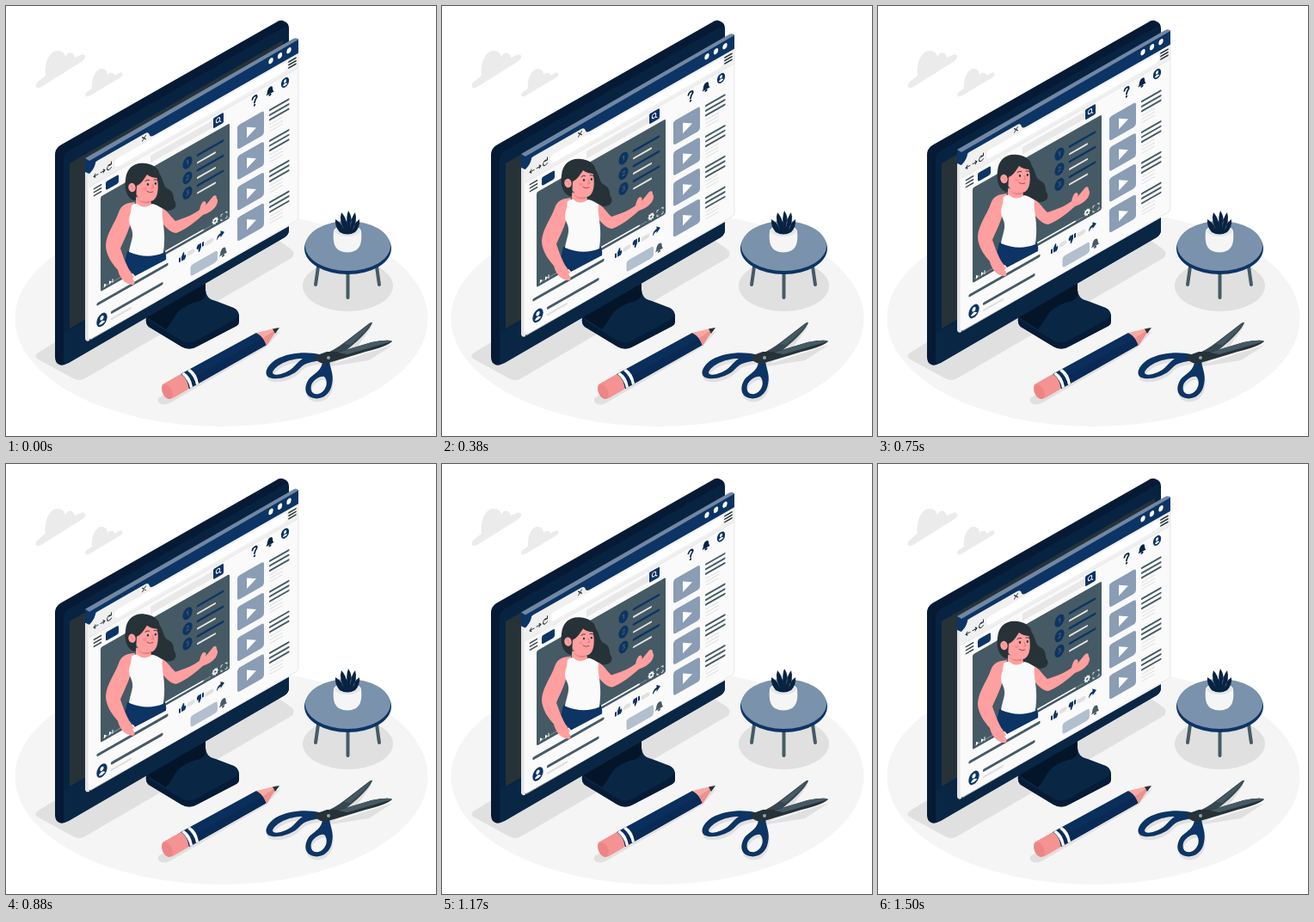
Write an HTML page with a canvas that moves like this. It is 500 by 500 pixels and loops after 1.54 s.

```html
<!DOCTYPE html>
<html lang="en">
<head>
<meta charset="utf-8">
<title>Floating video page</title>
<style>
html, body { margin: 0; width: 100%; height: 100%; overflow: hidden; background: #fff; }
canvas { display: block; width: 500px; height: 500px; }
</style>
</head>
<body>
<canvas id="stage"></canvas>
<script>
const LOOP = 1540, FRAMES = 37, RISE = 10;
const NAVY = '#0c3464', DEEP = '#082342', EDGE = '#092645', SLATE = '#455a64', COAL = '#263238';
const SKIN = '#ff9f9f', BLUE = '#8a9db5', FLOOR = '#f5f5f5', SHADE = '#e0e0e0', PALE = '#ebebeb';

const LEFT_HANDLE = 'M364 405C352 402 330 402 314 411C303 418 299 428 306 432C316 436 334 430 341 422C347 415 354 414 366 412ZM310 426C313 418 328 410 345 410C338 414 335 422 325 426C318 429 310 430 310 426Z';
const RIGHT_HANDLE = 'M368 410L376 411C376 420 382 428 379 440C377 452 367 458 358 456C347 454 346 443 352 434C358 427 369 424 368 410ZM370 431C375 436 373 446 366 450C358 454 353 448 355 441C357 435 365 430 370 431Z';

const canvas = document.getElementById('stage');
const ctx = canvas.getContext('2d');
const dpr = window.devicePixelRatio || 1;
canvas.width = canvas.height = 500 * dpr;

function fill(color, d) {
  ctx.fillStyle = color;
  ctx.fill(new Path2D(d), 'evenodd');
}

function stroke(color, width, d) {
  ctx.strokeStyle = color;
  ctx.lineWidth = width;
  ctx.stroke(new Path2D(d));
}

function oval(color, x, y, rx, ry = rx, turn = 0) {
  ctx.fillStyle = color;
  ctx.beginPath();
  ctx.ellipse(x, y, rx, ry, turn, 0, Math.PI * 2);
  ctx.fill();
}

function box(color, x, y, w, h, r = 0) {
  ctx.fillStyle = color;
  ctx.beginPath();
  ctx.roundRect(x, y, w, h, r);
  ctx.fill();
}

function bar(color, width, x1, x2, y) {
  stroke(color, width, `M${x1} ${y}H${x2}`);
}

function placed(x, y, draw) {
  ctx.save();
  ctx.translate(x, y);
  draw();
  ctx.restore();
}

function drawClouds() {
  fill(PALE, 'M36 89L46 81C44 65 51 52 60 52C66 52 68 55 69 59C72 52 79 54 80 60L87 57C93 55 94 60 89 64L41 94C35 97 33 93 36 89Z');
  fill(PALE, 'M94 100L100 96C99 83 105 73 111 73C116 73 118 76 118 80C121 76 126 77 126 81L131 78C136 76 137 80 133 83L98 104C93 107 90 104 94 100Z');
}

function drawMonitor() {
  fill(SHADE, 'M36 404L62 388L316 272L332 283Q337 288 332 293L92 433Q85 437 78 433L36 410Q33 407 36 404Z');
  fill(EDGE, 'M163 362L232 321V330C233 339 237 341 244 343L265 351Q271 354 271 361V367Q271 370 268 372L222 396Q213 401 204 396L166 373Q162 370 163 362Z');
  fill('#04152a', 'M163 361L190 344L232 320V331C233 338 230 342 222 344C207 348 200 354 195 363Q191 370 186 376L167 364Z');
  fill('#061b35', 'M163 362Q166 366 171 369L204 389Q213 394 222 389L265 365Q270 362 271 358V367Q271 370 268 372L222 396Q213 401 204 396L166 373Q162 370 163 362Z');
  fill('#061a35', 'M57 173Q57 166 63 162L314 19Q319 15 324 18Q329 20 329 26V260Q329 266 324 269L72 415Q66 419 62 417Q57 415 57 408Z');
  fill(DEEP, 'M67 179Q67 173 72 169L321 26Q329 21 329 29V254Q329 260 324 263L73 409Q67 412 67 407Z');
  fill(EDGE, 'M67 381L329 230V260Q329 266 324 269L73 415Q67 418 67 413Z');
  fill(COAL, 'M74 183L322 40V232L74 375Z');
}

function drawTable() {
  oval(SHADE, 397.5, 325.5, 52.5, 29.5);
  ctx.lineCap = 'round';
  stroke(SLATE, 4, 'M363 303L360 324M397.5 308V339M431 303L434 324');
  oval(NAVY, 397.5, 282, 50.5, 30);
  oval('#7a92ac', 397.5, 279, 49.5, 29);
  fill('#f5f5f5', 'M381 262C381 253 413 253 413 262C414 272 413 280 407 284Q397 289 387 284C381 280 380 272 381 262Z');
  fill('#e3e6e9', 'M382 262C383 255 411 255 412 262C408 270 386 270 382 262Z');
  fill(DEEP, 'M388 263Q382 256 383 248Q389 251 393 260Q387 249 390 240Q396 246 397 257Q395 246 398 238Q404 246 400 257Q401 246 406 240Q409 250 403 260Q406 251 411 248Q412 257 406 263Q397 268 388 263Z');
}

function drawPencil() {
  fill(SHADE, 'M177 456L298 387L319 378L302 397L190 462Q181 466 177 460Z');
  fill('#f49391', 'M182 440L203 428Q211 433 213 445L194 456Q186 459 182 449Q180 443 182 440Z');
  oval('#ec8585', 187.5, 448.5, 5.5, 9, -.45);
  fill('#0a2f5c', 'M203 428L291 380Q298 380 303 394L213 445Q211 433 203 428Z');
  fill('#092a54', 'M211 436L299 386L303 394L213 445Z');
  for (const shift of [0, 7]) {
    placed(shift, -shift * .57, () => fill('#fff', 'M204 428L207 426Q215 431 217 443L214 444.5Q212 434 204 428Z'));
  }
  fill('#f7aaa3', 'M291 380L316 374L303 395Q300 385 291 380Z');
  fill('#ec918d', 'M299 386L316 375L303 395Z');
  fill(COAL, 'M310 375.5L318 374L313 381Z');
}

function drawScissors() {
  placed(1, 4, () => {
    fill(SHADE, LEFT_HANDLE);
    fill(SHADE, RIGHT_HANDLE);
    fill(SHADE, 'M367 407L397 386L425 368L407 393L380 412L449 390L421 408L377 415Z');
  });
  fill(NAVY, LEFT_HANDLE);
  fill(NAVY, RIGHT_HANDLE);
  fill('#37474f', 'M369 405Q381 401 395 390L421 370Q425 367 426 368Q424 375 408 390Q390 406 372 415Z');
  fill(SLATE, 'M393 393L425 368Q421 376 400 394Z');
  fill(COAL, 'M359 407L373 402L388 402L425 391Q446 387 449 390Q443 396 418 402Q389 411 371 416Q360 415 359 407Z');
  fill(SLATE, 'M386 403L425 391Q446 387 449 390L397 405Z');
  oval('#90a4ae', 375, 409, 2);
}

function drawPerson(color, r) {
  oval(color, 0, 0, r, r * 1.2);
  oval('#fff', 0, -r * .35, r * .34, r * .4);
  fill('#fff', `M${-r * .6} ${r * .6}Q0 ${-r * .2} ${r * .6} ${r * .6}Q0 ${r} ${-r * .6} ${r * .6}Z`);
}

function drawBell(color) {
  fill(color, 'M-4.5 3Q-3 1 -3 -2Q-2 -5 0 -5Q3 -5 3 -2Q3 1 4.5 3Z');
  oval(color, 0, 4.3, 1.6, 1.2);
}

function drawThumb() {
  fill(NAVY, 'M-4 -1H-2V4H-4ZM-1 -1L1 -5Q3 -5 2 -1H4Q5 2 3 4H-1Z');
}

function drawBrowserBar() {
  box(NAVY, 0, 0, 248, 19);
  fill('#f0f0f0', 'M0 35V19Q11 18 11 13Q11 10 14 10H70Q74 10 75 15Q76 18 80 18H248V35Z');
  box('#fff', 34, 20.5, 201, 10, 5);
  bar('#e6e6e6', 1, 5, 248, 35);
  for (const x of [216, 226.5, 237]) oval('#fff', x, 8.8, 2.7, 3.3);
  stroke(COAL, 1, 'M66.5 12.5L70.5 17M70.5 12.5L66.5 17');
  stroke(COAL, 1, 'M15 26H10M12 24L10 26L12 28M18 26H23M21 24L23 26L21 28M30 23Q26 21 25.5 26Q27 30 30.5 27M30.5 20.5V23.5H28');
  for (const y of [22, 25.5, 29]) bar(COAL, 1.6, 237, 245, y);
}

function drawHeader() {
  for (const y of [40.5, 44.5, 48.5]) bar('#37474f', 1.7, 10.5, 18.5, y);
  box(NAVY, 24, 40, 15, 10, 2);
  box('#e8e8e8', 76, 39.5, 72, 8.5, 1);
  box(NAVY, 149, 37.5, 12, 12, 1.5);
  stroke('#fff', 1, 'M158 46.5L156 44.7M156.7 42.7A2.2 2.5 0 1 1 152.3 42.7A2.2 2.5 0 1 1 156.7 42.7');
  stroke(DEEP, 2, 'M194.5 41.5Q195 39 197 39Q200 39 199.5 42Q197 44 197 46.5');
  oval(DEEP, 197, 49.5, 1.2);
  placed(215, 43.5, () => drawBell(DEEP));
  placed(232.5, 43.5, () => drawPerson(NAVY, 4.6));
}

function drawVideo() {
  box(SLATE, 18, 54, 150, 110.5, 2);
  ctx.textAlign = 'center';
  ctx.textBaseline = 'middle';
  ctx.font = '700 8px "Open Sans", sans-serif';
  for (let i = 0; i < 3; i++) {
    const y = 72 + i * 17.6;
    oval(NAVY, 119, y, 5.6, 6.8);
    ctx.fillStyle = SLATE;
    ctx.fillText(i + 1, 119, y + .5);
    bar(NAVY, 2.7, 131, 160, y - 2);
    bar('#e6e6e6', 2.1, 131, 151, y + 6.7);
  }
  bar('#788990', 1.3, 21, 146, 160.8);
  bar('#fff', 1.8, 94, 137, 160.8);
  fill('#fff', 'M22 157.5V162L25 160ZM28 157.5V162L31 160ZM31.5 157.5H32.5V162H31.5Z');
  stroke('#fff', 1.4, 'M153.5 158A2.3 2.6 0 1 1 148.9 158A2.3 2.6 0 1 1 153.5 158');
  stroke('#fff', .8, 'M151.2 154.2V162M147.6 158H154.8M148.7 155L153.7 161M153.7 155L148.7 161');
  oval(SLATE, 151.2, 158, 1.1);
  stroke('#fff', .8, 'M158 157V155H160M163 155H165V157M165 160V162H163M160 162H158V160');
}

function drawDetails() {
  bar(SLATE, 3.3, 15, 95, 177);
  bar(SLATE, 3.3, 31.5, 89, 195.8);
  bar(SHADE, 2.5, 31, 53, 203.5);
  placed(19.5, 198, () => drawPerson(NAVY, 6.2));
  placed(113, 178.5, drawThumb);
  placed(134, 178.5, () => { ctx.rotate(Math.PI); drawThumb(); });
  bar(SHADE, 5, 121, 125, 178.5);
  bar(SHADE, 5, 142, 147, 178.5);
  fill(NAVY, 'M153 182Q153 176 157.5 176V173L162 177L157.5 181V178.5Q155 178.5 153 182Z');
  box('#b2bfce', 122.5, 193.5, 31.5, 13, 3);
  placed(160.5, 199.5, () => drawBell(SLATE));
}

function drawList() {
  for (let i = 0; i < 4; i++) {
    const y = i * 35.7;
    box(BLUE, 177, y + 62, 31, 28, 3);
    fill('#fff', `M188 ${y + 70}L199 ${y + 77}L188 ${y + 82.5}Z`);
    for (let k = 0; k < 3; k++) {
      bar(SLATE, 2.2, 215, 236.5, y + 65.5 + k * 5.6);
      bar('#dedede', 1, 215, 229.5, y + 82 + k * 4);
    }
  }
}

function drawWoman() {
  fill(COAL, 'M170 190C184 194 181 207 187 212C198 217 193 224 197 228C200 238 188 240 180 236L158 230Z');
  fill(NAVY, 'M141 285L184 284Q187 290 186 295L150 314Q144 306 137 303Z');
  fill(SKIN, 'M150 228C140 229 134 231 131 240C127 252 117 264 116 278C116 290 124 300 130 307C132 316 138 323 146 324C151 325 150 320 147 317L149 315C144 309 139 300 133 282C136 274 143 262 146 248Z');
  fill(SKIN, 'M177 234C186 234 190 244 197 250C209 246 219 242 225 237C226 232 228 227 231 227C233 228 233 230 232 232L241 221C244 219 245 221 245 224C247 226 246 229 244 233C240 238 235 241 229 243C221 250 209 260 198 264Q190 264 179 249Z');
  fill(SKIN, 'M151 222L168 224L169 231L181 235L179 246L142 243L141 231Q144 230 151 230Z');
  fill('#fafafa', 'M146 232Q150 229 153 230Q160 237 170 230Q176 231 182 236C180 249 187 259 183 287Q164 295 143 286C145 273 150 267 145 257Q141 250 145 240Z');
  fill('#e78280', 'M153 224Q160 230 168 226L167 229Q158 231 153 224Z');
  fill(SKIN, 'M149 205C149 191 174 190 176 202C178 214 176 227 167 227C158 227 151 222 149 213Z');
  fill(COAL, 'M148 226C141 223 137 213 139 202C140 187 151 181 162 183C173 184 182 192 177 200Q169 200 164 196C160 202 157 207 152 209L151 226Z');
  oval(SKIN, 146.5, 211, 4.2, 5.2, -.2);
  stroke('#e78280', .9, 'M144.5 209Q147 208 147.5 213');
  oval(COAL, 165, 207.5, 1.1, 1.4);
  oval(COAL, 173.8, 206.5, 1.1, 1.4);
  stroke(COAL, .9, 'M162 203.5Q164 201.5 166.5 202.5M172 202Q174 201 176 202.5');
  stroke('#e06b70', .9, 'M170 207L171.8 211.5L169.5 212');
  stroke('#9d3d48', .9, 'M164 215.5Q167 218 171 216');
  oval('#f98c90', 161.5, 212.5, 2.4, 1.8);
}

function drawPage() {
  fill('#e3e3e3', 'M92 179L97 181V389Q93 391 92 387Z');
  ctx.save();
  ctx.transform(1, -.57, 0, 1, 92, 178);
  ctx.beginPath();
  ctx.roundRect(3.5, 1, 244.5, 212, [2, 2, 4, 4]);
  ctx.clip();
  box('#fafafa', 0, 0, 248, 214);
  drawBrowserBar();
  drawHeader();
  drawVideo();
  drawDetails();
  drawList();
  ctx.restore();
  stroke('#dedede', .7, 'M340 55V245Q340 248 337 250L98 388');
  fill(NAVY, 'M92 178L104 174V183Q102 190 97 195L92 193Z');
  fill('#7187a3', 'M92 177L334 38Q338 36 340 39L97 180Z');
  drawWoman();
}

function draw(now) {
  const t = (now - start) % LOOP;
  const step = Math.min(FRAMES - 1, Math.floor((t + 3) * FRAMES / LOOP));
  const half = (FRAMES - 1) / 2;
  const lift = RISE * (1 - Math.abs(step - half) / half);

  ctx.setTransform(dpr, 0, 0, dpr, 0, 0);
  ctx.lineCap = ctx.lineJoin = 'round';
  ctx.fillStyle = '#fff';
  ctx.fillRect(0, 0, 500, 500);
  oval(FLOOR, 250.5, 363.5, 240, 125.5);
  drawClouds();
  drawMonitor();
  drawTable();
  drawPencil();
  drawScissors();
  placed(0, -lift, drawPage);
}

function tick() {
  draw(performance.now());
  requestAnimationFrame(tick);
}

const start = performance.now();
tick();
</script>
</body>
</html>
```
